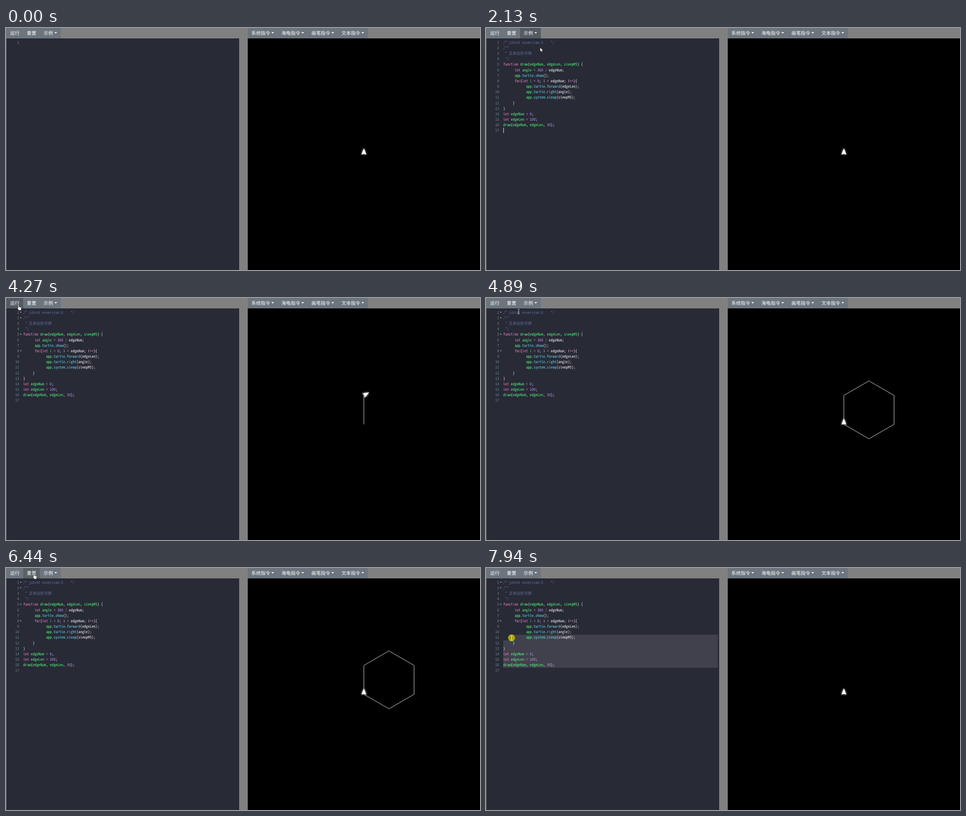
Write an HTML page that moves like this. It is 1047 by 535 pixels and loops after 8 s.

```html
<!DOCTYPE html>
<html lang="zh">
<head>
<meta charset="utf-8">
<style>
  html, body { margin: 0; width: 100%; height: 100%; overflow: hidden; background: #808080; }
  svg { display: block; width: 100vw; height: 100vh; }
  text { white-space: pre; text-rendering: geometricPrecision; }
  .ui { font: 10.4px "Noto Sans CJK SC", "Noto Sans CJK", sans-serif; }
  .code { font-family: "Noto Sans Mono CJK SC", "Noto Sans Mono", monospace; }
  .turtle { filter: drop-shadow(0 0 2px #fff); }
</style>
</head>
<body>
<script>
const LOOP = 8000, FRAME = 80;
const OPEN_MENU = 970, PICK = 1970, LOAD = 2130, RUN = 4110, RESET = 6550, DRAG = 7790;
const FIRST_EDGE = 4270, EDGE_TIME = 50, SIDE = 64;
const ADVANCE = 4.2, LINE = 12.16, TOP = 25.9, LEFT = 38;
const BASE = '#6c757d', HOVER = '#5a6268', ACTIVE = '#545b62';
const BAR = 23, FADE = 120;

const SOURCE = `/* jshint esversion:6    */
/**
 * 正多边形示例
 */
function draw(edgeNum, edgeLen, sleepMS) {
      let angle = 360 / edgeNum;
      app.turtle.show();
      for(let i = 0; i < edgeNum; i++){
            app.turtle.forward(edgeLen);
            app.turtle.right(angle);
            app.system.sleep(sleepMS);
     }
}
let edgeNum = 6;
let edgeLen = 100;
draw(edgeNum, edgeLen, 30);
`.split('\n');

// Pointer moves: start, end, x and y reached
const ENTRY = [864, 492];
const MOVES = [
  [70, 560, 14, 9], [600, 800, 100, 9], [1000, 1200, 116.5, 57], [1520, 1760, 119.5, 43],
  [2370, 3120, 582, 110], [3230, 3760, 28, 15], [4400, 4720, 72, 30], [4890, 5280, 561, 182],
  [5300, 5760, 65, 16.5], [5860, 6400, 62, 12], [7010, 7120, 101, 10],
  [7200, 7600, 155, 223], [DRAG, 7920, 56.5, 154.5]
];

const within = (t, from, to) => t >= from && t < to;
const clamp = (value, low, high) => Math.min(high, Math.max(low, value));
const ease = k => k < 0.5 ? 2 * k * k : 1 - 2 * (1 - k) ** 2;

function make(parent, tag, attrs = {}, content = '') {
  const node = document.createElementNS('http://www.w3.org/2000/svg', tag);
  for (const key in attrs) node.setAttribute(key, attrs[key]);
  node.textContent = content;
  parent.append(node);
  return node;
}
const rect = (parent, x, y, width, height, fill, more) =>
  make(parent, 'rect', { x, y, width, height, fill, ...more });
const label = (parent, x, y, content, fill = '#fff') =>
  make(parent, 'text', { x, y, fill, class: 'ui' }, content);
const show = (node, on) => { node.style.display = on ? '' : 'none'; };

const svg = make(document.body, 'svg', { viewBox: '0 0 1047 535', preserveAspectRatio: 'none' });
rect(svg, 0, 0, 1047, 535, '#808080');
rect(svg, 1, BAR, 514, 512, '#282a36');
rect(svg, 534, BAR, 513, 512, '#000');

function button(x, width, title, hasArrow) {
  const face = rect(svg, x, 0, width, BAR, BASE);
  label(svg, x + 8, 15.1, title);
  if (hasArrow) make(svg, 'path', { d: `M${x + width - 14.2} 9.2h6.2l-3.1 3.1z`, fill: '#fff' });
  const ring = rect(svg, x - 1, -1, width + 2, BAR + 2, 'none',
    { stroke: '#828a91', 'stroke-width': 2, 'stroke-opacity': 0.5, rx: 2 });
  show(ring, false);
  const hovered = ([px, py]) => py < BAR && px >= x && px < x + width;
  return { face, ring, hovered };
}
const runButton = button(1, 37, '运行');
const resetButton = button(38, 37, '重置');
const exampleButton = button(75, 46, '示例', true);
['系统指令', '海龟指令', '画笔指令', '文本指令'].forEach((title, i) =>
  button(534 + i * 66.3, 66.3, title, true));

// Editor
const selection = make(svg, 'path', { fill: '#fff', 'fill-opacity': 0.11 });
const editor = make(svg, 'g', { class: 'code' });
const probe = document.createElement('canvas').getContext('2d');
probe.font = `100px ${getComputedStyle(editor).fontFamily}`;
editor.style.fontSize = ADVANCE * 100 / probe.measureText('0').width + 'px';

const rowTop = row => TOP + row * LINE;
const baseline = row => rowTop(row) + 8.9;
const lineNumber = (parent, row) => make(parent, 'text',
  { x: 29, y: baseline(row), 'text-anchor': 'end', fill: '#6d8a88' }, row + 1);

function tokenColor(token, before, row) {
  if (row < 4) return '#6272a4';
  if (/^(function|let|for)$/.test(token) || /^[=\/<+]/.test(token)) return '#ff79c6';
  if (/^\d/.test(token)) return '#bd93f9';
  if (!/^\w/.test(token)) return '#f8f8f2';
  if (before.endsWith('.')) return '#66d9ef';
  const isGlobal = !SOURCE[row].startsWith(' ') || token === 'app' || before.endsWith('let ');
  return isGlobal ? '#50fa7b' : '#f8f8f2';
}

lineNumber(editor, 0);
const program = make(editor, 'g');
SOURCE.forEach((line, row) => {
  if (row) lineNumber(program, row);
  const indent = line.search(/\S|$/);
  const text = make(program, 'text', { x: LEFT + indent * ADVANCE, y: baseline(row) });
  const body = line.slice(indent);
  const tokens = row < 4 ? [body] : body.match(/\w+|[=\/<+]+|[^\w=\/<+]+/g) || [];
  tokens.reduce((before, token) => {
    make(text, 'tspan', { fill: tokenColor(token, before, row) }, token);
    return before + token;
  }, '');
});
const foldable = SOURCE.flatMap((line, row) => /^\/\*|\{$/.test(line) ? [row] : []);
const folds = make(svg, 'path', {
  fill: '#a0a4a8',
  d: foldable.map(row => `M30.7 ${rowTop(row) + 4.7}h4l-2 2.4z`).join('')
});
const lastRow = SOURCE.length - 1;
const caret = rect(svg, LEFT + 0.3, rowTop(lastRow), 1, 11.6, '#f8f8f0');

// Example menu
const menu = make(svg, 'g');
rect(menu, 75.5, 25, 101.5, 51, '#fff', { rx: 2 });
const menuRow = rect(menu, 76, 30.5, 100.5, 20.5, '#f8f9fa');
const firstItem = label(menu, 91, 44.4, '正多边形');
label(menu, 91, 64.9, '填充正多边形', '#212529');

// Drawing area
const trail = make(svg, 'polyline', { fill: 'none', stroke: '#d8d8d8', 'stroke-width': 1 });
const turtle = make(svg, 'path', { class: 'turtle', fill: '#fff', d: 'M0-13.3L5.5 1Q0-3.2-5.5 1Z' });
const corners = [[790.5, 279.3]];
for (let i = 0; i < 6; i++) {
  const [x, y] = corners[i], angle = i * Math.PI / 3;
  corners.push([x + SIDE * Math.sin(angle), y - SIDE * Math.cos(angle)]);
}

// Pointer
const pointer = make(svg, 'g');
const disc = make(pointer, 'circle', { r: 7.8, fill: '#c8c200', 'fill-opacity': 0.78 });
const outlined = { fill: '#fff', stroke: '#111', 'stroke-width': 0.7, 'stroke-linejoin': 'round' };
const shapes = {
  arrow: make(pointer, 'path', { ...outlined, d: 'M0 0V9.5L2.2 7.6 3.8 11.2 5.3 10.5 3.8 7 6.8 6.8Z' }),
  hand: make(pointer, 'path', { ...outlined,
    d: 'M-1.2 1a1.1 1.1 0 0 1 2.2 0V4.8l4 .8q1.2.3 1.1 1.5L5.5 10.5V12.5H.5L-3 7.8q-.6-1.3.6-1.5L-1.2 7.5Z' }),
  beam: make(pointer, 'path', { fill: 'none', stroke: '#eee', 'stroke-width': 0.9,
    d: 'M-2-5H-.5L0-4.5 .5-5H2M0-4.5V4.5M-2 5H-.5L0 4.5 .5 5H2' })
};

function pointerAt(t) {
  const held = t - t % FRAME;
  return MOVES.reduce(([x, y], [start, end, toX, toY]) => {
    const k = ease(clamp((held - start) / (end - start), 0, 1));
    return [x + (toX - x) * k, y + (toY - y) * k];
  }, ENTRY);
}

function pointerShape(t, x, y) {
  if (y < BAR && x < 121) return 'hand';
  if (within(t, OPEN_MENU, LOAD + FRAME)) return 'arrow';
  return x > LEFT && x < 515 && y > BAR ? 'beam' : 'arrow';
}

function selectionPath(x, y) {
  const row = Math.floor((y - TOP) / LINE);
  if (row >= lastRow) return '';
  const column = Math.min(SOURCE[row].length, Math.round((x - LEFT) / ADVANCE));
  return `M${LEFT + column * ADVANCE} ${rowTop(row)}H512V${rowTop(lastRow)}H${LEFT}V${rowTop(row + 1)}` +
    `H${LEFT + column * ADVANCE}Z`;
}

// Hover colours settle a moment after the pointer arrives
function paintButton({ face, ring, hovered }, t, active, focused) {
  const fill = active ? ACTIVE : focused || hovered(pointerAt(t - FADE)) ? HOVER : BASE;
  face.setAttribute('fill', fill);
  show(ring, focused);
}

function render(t) {
  const [x, y] = pointerAt(t);
  const shape = pointerShape(t, x, y);
  pointer.setAttribute('transform', `translate(${x} ${y})`);
  show(pointer, t >= 70);
  for (const name in shapes) show(shapes[name], name === shape);
  const clicked = [OPEN_MENU - FRAME, RUN, RESET].some(at => within(t, at, at + FRAME));
  show(disc, clicked || within(t, PICK, LOAD) || t >= DRAG);

  paintButton(runButton, t, within(t, RUN, RUN + 2 * FADE), false);
  paintButton(resetButton, t, false, within(t, RESET, DRAG));
  paintButton(exampleButton, t, within(t, OPEN_MENU - FRAME, LOAD + FRAME),
    within(t, OPEN_MENU - FRAME, LOAD));

  const picked = t >= PICK;
  show(menu, within(t, OPEN_MENU, LOAD));
  show(menuRow, y > 30);
  menuRow.setAttribute('y', y > 51 ? 51 : 30.5);
  menuRow.setAttribute('fill', picked ? '#007bff' : '#f8f9fa');
  firstItem.setAttribute('fill', picked ? '#fff' : '#212529');

  show(program, t >= LOAD);
  show(folds, t >= LOAD + 720);
  const blinkOn = (t - LOAD) % 1060 < 530;
  show(caret, within(t, LOAD, RUN - FRAME) && blinkOn || within(t, DRAG, DRAG + FRAME));
  selection.setAttribute('d', t >= DRAG ? selectionPath(x, y) : '');

  const steps = 1 + Math.floor((t - FIRST_EDGE) / EDGE_TIME);
  const edges = t < RESET ? clamp(steps, 0, 6) : 0;
  trail.setAttribute('points', corners.slice(0, edges + 1).join(' '));
  turtle.setAttribute('transform', `translate(${corners[edges]}) rotate(${edges * 60})`);
}

const start = performance.now();
function tick() {
  render((performance.now() - start) % LOOP);
  requestAnimationFrame(tick);
}
tick();
</script>
</body>
</html>
```
